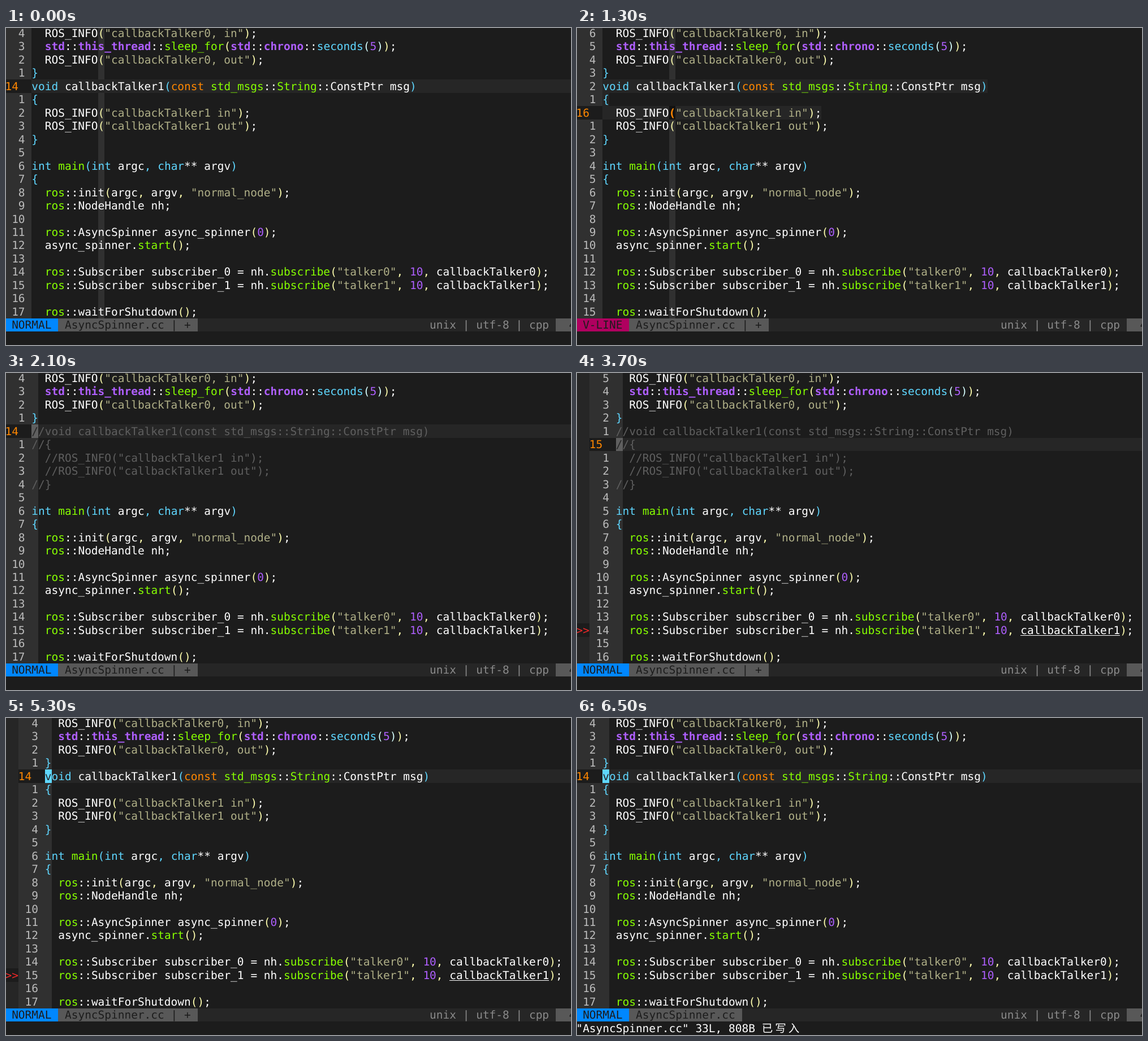
These frames come from a looping animation (999 by 561 pixels, 6900 ms). An HTML page:

```html
<!DOCTYPE html>
<html lang="zh-CN">
<head>
<meta charset="utf-8">
<title>Commenting lines in an editor</title>
<style>
  html, body { margin: 0; width: 100%; height: 100%; overflow: hidden; background: #1c1c1c; }
  svg { display: block; width: 999px; height: 561px; }
  rect { shape-rendering: crispEdges; }
  text {
    font: 19.48px "DejaVu Sans Mono", "Noto Sans CJK SC", "Noto Sans CJK", monospace;
    white-space: pre;
    text-rendering: geometricPrecision;
  }
  .bold { font-weight: bold; }
</style>
</head>
<body>
<svg id="screen" viewBox="0 0 999 561"></svg>
<script>
const CELL_W = 11.73, CELL_H = 23.48, LEFT = -1.6, TOP = -2.7, BASELINE = 18.5;
const LOOP = 6900, FIRST_LINE = 10, STATUS_ROW = 22, CMD_ROW = 23;

const C = {
  bg: '#1c1c1c', line: '#262626', gutter: '#303030', number: '#bcbcbc', bar: '#585858',
  white: '#ffffff', orange: '#ff8700', green: '#87ff00', cyan: '#5fd7ff', purple: '#af5fff',
  string: '#afaf87', comment: '#5f5f5f', barText: '#8a8a8a', match: '#121212',
  normal: '#0087ff', visual: '#af005f', error: '#ef2929'
};
const RAINBOW = ['#5fd7ff', '#ffffaf', '#d7ffff'];

const SOURCE = `  ROS_INFO("callbackTalker0, in");
  std::this_thread::sleep_for(std::chrono::seconds(5));
  ROS_INFO("callbackTalker0, out");
}
void callbackTalker1(const std_msgs::String::ConstPtr msg)
{
  ROS_INFO("callbackTalker1 in");
  ROS_INFO("callbackTalker1 out");
}

int main(int argc, char** argv)
{
  ros::init(argc, argv, "normal_node");
  ros::NodeHandle nh;

  ros::AsyncSpinner async_spinner(0);
  async_spinner.start();

  ros::Subscriber subscriber_0 = nh.subscribe("talker0", 10, callbackTalker0);
  ros::Subscriber subscriber_1 = nh.subscribe("talker1", 10, callbackTalker1);

  ros::waitForShutdown();`.split('\n');

const WORDS = [
  [/^"/, C.string],
  [/^(std|this_thread|chrono)$/, C.purple, true],
  [/^\d+$/, C.purple],
  [/^(void|int|char|seconds)$/, C.cyan],
  [/^(ros|std_msgs|String|sleep_for|main|start|subscribe)$/, C.green],
  [/^const$/, C.orange]
];

// Splits the code into coloured tokens; brackets and commas take the colour of their depth.
function highlight(lines) {
  let depth = 1;
  return lines.map(text => [...text.matchAll(/"[^"]*"|\w+|::|[^\s\w]/g)].map(({ 0: word, index }) => {
    const [, color = C.white, bold = false] = WORDS.find(([rule]) => rule.test(word)) || [];
    const token = { word, col: index, color, bold };
    if (/[({]/.test(word)) token.color = RAINBOW[depth++];
    else if (/[)}]/.test(word)) token.color = RAINBOW[--depth];
    else if (word === ',') token.color = RAINBOW[depth - 1];
    return token;
  }));
}

const isBlock = line => line >= 14 && line <= 18;
const commentOut = (text, i) =>
  isBlock(i + FIRST_LINE) ? text.replace(/^\s*/, '$&//') : text;

const plain = { lines: SOURCE, tokens: highlight(SOURCE) };
const commentedLines = SOURCE.map(commentOut);
const commented = {
  lines: commentedLines,
  tokens: plain.tokens.map((tokens, i) => {
    if (!isBlock(i + FIRST_LINE)) return tokens;
    const word = commentedLines[i].trim();
    return [{ word, col: commentedLines[i].indexOf(word), color: C.comment }];
  })
};

// Each step changes only the listed properties.
const STEPS = [
  [0, { line: 14, col: 10, cursor: false, visual: false, code: plain, sign: false, saved: false, cmd: '', mate: 0 }],
  [200, { cursor: true }],
  [900, { visual: true }],
  [1100, { line: 15, col: 0, mate: 18 }],
  [1300, { line: 16, col: 10, mate: 0 }],
  [1500, { line: 17 }],
  [1600, { line: 18, col: 0 }],
  [2100, { line: 14, visual: false, code: commented }],
  [3700, { line: 15, sign: true }],
  [3800, { line: 14 }],
  [4100, { visual: true }],
  [4400, { line: 16 }],
  [4600, { line: 17 }],
  [4800, { line: 18 }],
  [5300, { line: 14, visual: false, code: plain }],
  [5400, { cmd: ':', cursor: false }],
  [5500, { cmd: ':w' }],
  [5600, { cmd: '"AsyncSpinner.cc" 33L, 808B 已写入', cursor: true, saved: true }],
  [6200, { cursor: false }],
  [6500, { cursor: true, sign: false }]
];
const states = [];
for (const [time, change] of STEPS) states.push({ ...states.at(-1), ...change, time });

const x = col => LEFT + col * CELL_W;
const y = row => TOP + row * CELL_H;
const box = (col, row, cols, rows, fill) =>
  `<rect x="${x(col)}" y="${y(row)}" width="${cols * CELL_W}" height="${rows * CELL_H}" fill="${fill}"/>`;
const write = (text, col, row, fill, bold) =>
  `<text x="${x(col)}" y="${y(row) + BASELINE}" fill="${fill}"${bold ? ' class="bold"' : ''}>${text}</text>`;

function drawCursor(s, left) {
  const row = s.line - FIRST_LINE;
  const char = s.code.lines[row][s.col];
  const token = s.code.tokens[row].find(t => s.col >= t.col && s.col < t.col + t.word.length);
  const bracket = /[(){}]/.test(char);
  const back = bracket ? C.match : token ? token.color : C.white;
  const ink = bracket ? C.orange : s.visual ? C.bg : C.line;
  return box(left + s.col, row, 1, 1, back) + write(char, left + s.col, row, ink, bracket);
}

function drawStatus(s) {
  const file = s.saved ? ' AsyncSpinner.cc ' : ' AsyncSpinner.cc | + ';
  const percent = Math.floor(s.line / 33 * 100) + '%';
  return box(0, STATUS_ROW, 87, 1, C.line) +
    box(0, STATUS_ROW, 8, 1, s.visual ? C.visual : C.normal) +
    write(s.visual ? 'V-LINE' : 'NORMAL', 1, STATUS_ROW, C.bg) +
    box(8, STATUS_ROW, file.length, 1, C.bar) +
    write(file.trim(), 9, STATUS_ROW, C.bg) +
    write('unix | utf-8 | cpp', 64, STATUS_ROW, C.barText) +
    box(83, STATUS_ROW, 4, 1, C.bar) +
    write(percent, 85, STATUS_ROW, C.bg);
}

function drawCommand(cmd) {
  const [, latin, wide] = cmd.match(/^([\x00-\x7f]*)(.*)$/);
  let out = write(latin, 0, CMD_ROW, C.white);
  [...wide].forEach((char, i) => out += write(char, latin.length + 2 * i, CMD_ROW, C.white));
  if (cmd[0] === ':') out += box(cmd.length, CMD_ROW, 1, 1, C.white);
  return out;
}

function draw(s) {
  const shift = s.sign ? 2 : 0, left = shift + 4, current = s.line - FIRST_LINE;
  let out = `<rect width="999" height="561" fill="${C.bg}"/>`;
  if (s.sign) out += box(0, 0, 2, 22, C.line) + box(0, 19, 2, 1, C.bg) + write('>>', 0, 19, C.error);
  out += box(shift, 0, 4, 22, C.gutter) + box(left + s.col, 0, 1, 22, C.gutter);
  out += box(shift, current, 4, 1, C.bg);

  if (s.visual) {
    for (let line = 14; line <= s.line; line++) {
      const row = line - FIRST_LINE;
      out += box(left + s.col, row, 1, 1, C.bg) + box(left, row, s.code.lines[row].length, 1, C.line);
    }
  } else {
    out += box(left, current, 87 - left, 1, C.line);
  }

  s.code.tokens.forEach((tokens, row) => {
    const distance = String(Math.abs(row - current));
    out += row === current
      ? write(s.line, shift, row, C.orange)
      : write(distance, shift + 3 - distance.length, row, C.number);
    for (const t of tokens) out += write(t.word, left + t.col, row, t.color, t.bold);
  });

  if (s.sign) {
    out += `<rect x="${x(left + 61)}" y="464" width="${15 * CELL_W}" height="1" fill="${C.white}"/>`;
  }
  if (s.mate) {
    const row = s.mate - FIRST_LINE;
    out += box(left, row, 1, 1, C.orange) + write('}', left, row, C.match, true);
  }
  if (s.cursor) out += drawCursor(s, left);
  return out + drawStatus(s) + drawCommand(s.cmd);
}

const screen = document.getElementById('screen');
const start = performance.now();
let shown;
function tick() {
  const time = (performance.now() - start) % LOOP;
  const state = states.findLast(s => s.time <= time);
  if (state !== shown) {
    shown = state;
    screen.innerHTML = draw(state);
  }
  requestAnimationFrame(tick);
}
tick();
</script>
</body>
</html>
```
